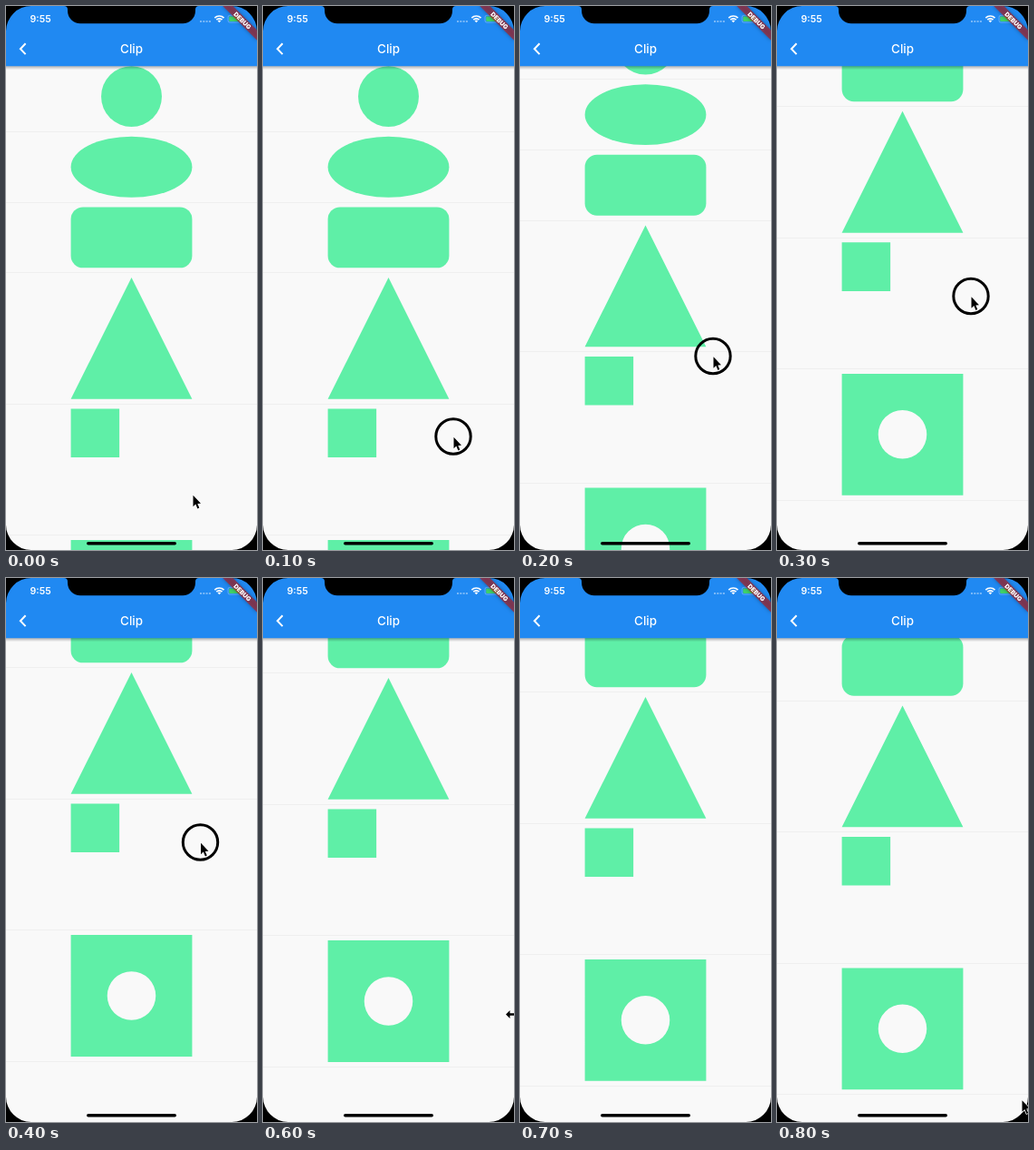
Recreate the animation shown at these times as an HTML page with a canvas. Size 277x599 px, loop 0.9 s.

```html
<!DOCTYPE html>
<html lang="en">
<head>
<meta charset="utf-8">
<title>Clip</title>
<style>
html, body { margin: 0; width: 100%; height: 100%; overflow: hidden; background: #000; }
canvas { display: block; width: 277px; height: 599px; }
</style>
</head>
<body>
<canvas id="stage"></canvas>
<script>
const W = 277, H = 599, PT = W / 414, CX = W / 2;
const STEP = 100, LOOP = 900;
const BAR = 66.2, LEFT = CX - 100 * PT;
const BLUE = '#2089f2', GREEN = '#5fefa7', PAPER = '#f9f9f9';
const FONT = 'Inter, Roboto, sans-serif';

// List offset while the finger drags; after that a spring takes over
const dragged = [0, 0, 57.6, 183.2, 195];
const END = 152;

// Pointer kind and tip at each step
const pointers = [
  ['arrow', 206, 538],
  ['press', 210, 474],
  ['press', 213, 385.5],
  ['press', 214, 319.5],
  ['press', 214.5, 291],
  ['arrow', 228, 332],
  ['resize', 268, 480.5],
  ['none', 0, 0],
  ['arrow', 270, 574.5]
];

const canvas = document.getElementById('stage');
const ctx = canvas.getContext('2d');
const dpr = window.devicePixelRatio || 1;
canvas.width = Math.round(W * dpr);
canvas.height = Math.round(H * dpr);

// Overdamped bounce back from beyond the end of the list
function bounce(ms) {
  const t = (ms - 600) / 1000;
  return END + 41.2 * Math.exp(-9.08 * t) - 4.2 * Math.exp(-22.04 * t);
}

function polygon(points, x = 0, y = 0) {
  ctx.beginPath();
  points.forEach(([px, py]) => ctx.lineTo(x + px, y + py));
  ctx.closePath();
}

function text(str, x, y, size, weight, align) {
  ctx.font = `${weight} ${size}px ${FONT}`;
  ctx.textAlign = align;
  ctx.fillStyle = '#fff';
  ctx.fillText(str, x, y);
}

// Each row: height in points and a path builder for its clipped shape
const rows = [
  [100, y => ctx.arc(CX, y + 50 * PT, 50 * PT, 0, 7)],
  [100, y => ctx.ellipse(CX, y + 50 * PT, 100 * PT, 50 * PT, 0, 0, 7)],
  [100, y => ctx.roundRect(LEFT, y, 200 * PT, 100 * PT, 20 * PT)],
  [200, y => polygon([[CX, 0], [CX + 100 * PT, 200 * PT], [LEFT, 200 * PT]], 0, y)],
  [200, y => ctx.rect(LEFT, y, 80 * PT, 80 * PT)],
  [200, y => {
    ctx.rect(LEFT, y, 200 * PT, 200 * PT);
    ctx.moveTo(CX + 40 * PT, y + 100 * PT);
    ctx.arc(CX, y + 100 * PT, 40 * PT, 0, 7);
  }]
];

function drawList(scroll) {
  let y = BAR - scroll;
  for (const [height, shape] of rows) {
    ctx.beginPath();
    shape(y);
    ctx.fillStyle = GREEN;
    ctx.fill('evenodd');
    y += height * PT;
    ctx.fillStyle = 'rgba(0,0,0,.04)';
    ctx.fillRect(0, Math.round(y + 8 * PT - 0.5), W, 1);
    y += 16 * PT;
  }
}

function drawBar() {
  const shade = ctx.createLinearGradient(0, BAR, 0, BAR + 4);
  shade.addColorStop(0, 'rgba(0,0,0,.28)');
  shade.addColorStop(1, 'rgba(0,0,0,0)');
  ctx.fillStyle = shade;
  ctx.fillRect(0, 66, W, 5);
  ctx.fillStyle = BLUE;
  ctx.fillRect(0, 0, W, BAR);

  ctx.strokeStyle = '#fff';
  ctx.lineWidth = 2;
  ctx.beginPath();
  ctx.moveTo(21.6, 41.3);
  ctx.lineTo(15.9, 47.2);
  ctx.lineTo(21.6, 53.1);
  ctx.stroke();
  text('Clip', CX, 52, 13.4, 500, 'center');
}

function drawStatus() {
  text('9:55', 26.5, 18, 10.6, 600, 'left');

  ctx.fillStyle = 'rgba(255,255,255,.4)';
  for (let i = 0; i < 4; i++) ctx.fillRect(214 + i * 3.3, 16, 2, 2);

  ctx.strokeStyle = ctx.fillStyle = '#fff';
  ctx.lineWidth = 1.7;
  for (const r of [4.4, 7.2]) {
    ctx.beginPath();
    ctx.arc(235.4, 18.2, r, -Math.PI * 0.75, -Math.PI * 0.25);
    ctx.stroke();
  }
  ctx.beginPath();
  ctx.moveTo(235.4, 18.2);
  ctx.arc(235.4, 18.2, 2.6, -Math.PI * 0.75, -Math.PI * 0.25);
  ctx.fill();

  ctx.strokeStyle = 'rgba(255,255,255,.4)';
  ctx.lineWidth = 0.7;
  ctx.beginPath();
  ctx.roundRect(245, 10.3, 15.5, 7.8, 2);
  ctx.stroke();
  ctx.fillStyle = '#3fd268';
  ctx.beginPath();
  ctx.roundRect(246.2, 11.5, 13, 5.4, 1);
  ctx.fill();
}

function drawBanner() {
  ctx.save();
  ctx.translate(W, 0);
  ctx.rotate(Math.PI / 4);
  ctx.scale(PT, PT);
  ctx.save();
  ctx.shadowColor = 'rgba(0,0,0,.5)';
  ctx.shadowBlur = 6 * PT * dpr;
  ctx.fillStyle = 'rgba(183,28,28,.63)';
  ctx.fillRect(-40, 28, 80, 12);
  ctx.restore();
  text('DEBUG', 0, 37.7, 10.2, 900, 'center');
  ctx.restore();
}

// Black surround of the phone screen, with notch and home bar
function drawDevice() {
  ctx.fillStyle = '#000';
  ctx.beginPath();
  ctx.rect(0, 0, W, H);
  ctx.roundRect(0, 0, W, H, 27.8);
  ctx.fill('evenodd');

  ctx.beginPath();
  ctx.moveTo(64, 0);
  ctx.quadraticCurveTo(68, 0, 68, 4);
  ctx.arcTo(68, 19.3, 84, 19.3, 14);
  ctx.arcTo(209, 19.3, 209, 4, 14);
  ctx.lineTo(209, 4);
  ctx.quadraticCurveTo(209, 0, 213, 0);
  ctx.fill();

  ctx.beginPath();
  ctx.roundRect(89, 590, 99, 3.6, 1.8);
  ctx.fill();
}

const arrow = [[0.5, 0.8], [0.5, 13.2], [3.3, 10.6], [5.4, 15.4], [7.3, 14.6], [5.3, 9.9], [9, 9.7]];
const resize = [[0, 0], [4.5, -4.5], [4.5, -1.3], [14, -1.3], [14, 1.3], [4.5, 1.3], [4.5, 4.5]];

function drawPointer(kind, x, y) {
  if (kind === 'none') return;
  if (kind === 'press') {
    ctx.strokeStyle = '#000';
    ctx.lineWidth = 3;
    ctx.beginPath();
    ctx.arc(x, y, 19.2, 0, 7);
    ctx.stroke();
  }
  polygon(kind === 'resize' ? resize : arrow, x, y);
  ctx.lineJoin = 'round';
  ctx.strokeStyle = '#fff';
  ctx.lineWidth = 1.6;
  ctx.stroke();
  ctx.fillStyle = '#000';
  ctx.fill();
  ctx.lineJoin = 'miter';
}

function draw(time) {
  const step = Math.floor((time % LOOP) / STEP);
  ctx.setTransform(dpr, 0, 0, dpr, 0, 0);
  ctx.fillStyle = PAPER;
  ctx.fillRect(0, 0, W, H);
  drawList(step < dragged.length ? dragged[step] : bounce(step * STEP));
  drawBar();
  drawStatus();
  drawBanner();
  drawDevice();
  drawPointer(...pointers[step]);
}

let start = null;
function tick(now) {
  if (start === null) start = now;
  draw(Math.max(0, now - start));
  requestAnimationFrame(tick);
}
draw(0);
requestAnimationFrame(tick);
</script>
</body>
</html>
```
